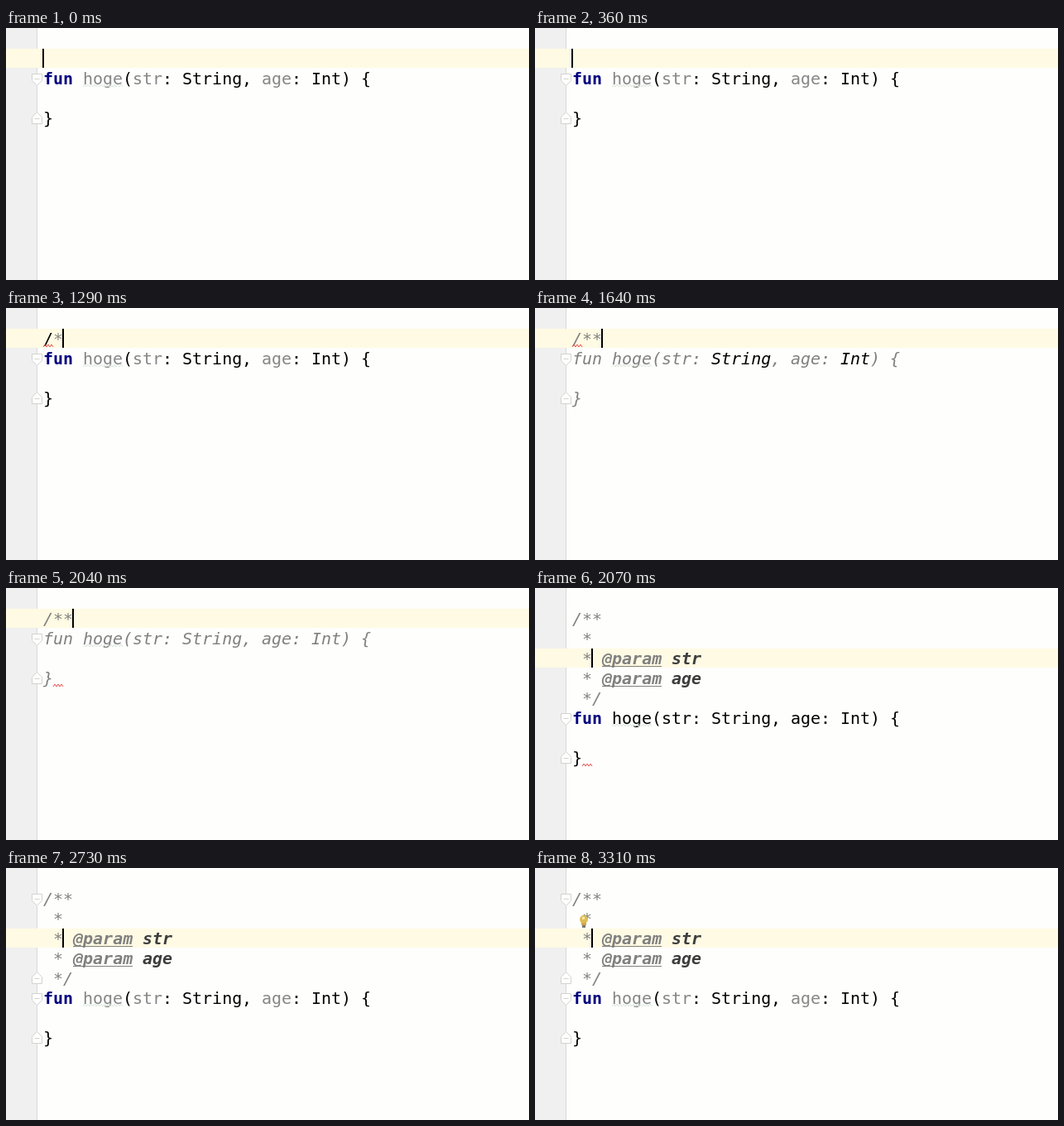
An HTML page with a canvas that plays this animation: 632x304 px, repeating every 3.46 s.

```html
<!DOCTYPE html>
<html lang="en">
<head>
<meta charset="utf-8">
<title>Doc comment completion</title>
<style>
  html, body { margin: 0; width: 100%; height: 100%; overflow: hidden; background: #fefefd; }
  canvas { display: block; }
</style>
</head>
<body>
<canvas id="editor" width="632" height="304"></canvas>
<script>
const ctx = document.getElementById('editor').getContext('2d');
const LOOP = 3460, LEFT = 45, CHAR = 12, LINE = 24;
const INK = '#000', KEYWORD = '#000080', UNUSED = '#868686', COMMENT = '#808080', RED = '#e8504c';

// Moments, in ms, at which the editor state changes
const AT = {
  slash: 730, error: 1030, star: 1290, comment: 1310, secondStar: 1640,
  types: 1760, enter: 2070, unused: 2480, folds: 2710, bulb: 3240
};

const colX = col => LEFT + col * CHAR;

function rect(x, y, w, h, color) {
  ctx.fillStyle = color;
  ctx.fillRect(x, y, w, h);
}

function text(row, col, str, color = INK, style = '') {
  ctx.font = `${style} 20px "DejaVu Sans Mono", monospace`;
  ctx.fillStyle = color;
  ctx.fillText(str, colX(col), row * LINE + 20);
}

function wave(row, col, length, color) {
  const y = row * LINE + 23, end = colX(col + length);
  ctx.beginPath();
  ctx.moveTo(colX(col), y);
  for (let x = colX(col) + 2, up = true; x <= end; x += 2, up = !up) ctx.lineTo(x, up ? y - 3 : y);
  ctx.strokeStyle = color;
  ctx.lineWidth = 1;
  ctx.stroke();
}

// Fold marker: pentagon pointing down (dir 1) or up (dir -1)
function fold(row, dir) {
  ctx.save();
  ctx.translate(37.5, row * LINE + 13.5);
  ctx.scale(1, dir);
  ctx.beginPath();
  ctx.moveTo(-6, -6);
  ctx.lineTo(6, -6);
  ctx.lineTo(6, 2);
  ctx.lineTo(0, 8);
  ctx.lineTo(-6, 2);
  ctx.closePath();
  ctx.fillStyle = '#fff';
  ctx.fill();
  ctx.strokeStyle = '#d2d2d0';
  ctx.lineWidth = 1;
  ctx.moveTo(-3, 0);
  ctx.lineTo(3, 0);
  ctx.stroke();
  ctx.restore();
}

function bulb(x, y) {
  ctx.beginPath();
  ctx.arc(x, y, 5, 0, 7);
  ctx.fillStyle = '#dfbd55';
  ctx.fill();
  rect(x - 2, y - 3, 3, 3, '#f8e6a4');
  rect(x - 3, y + 4, 6, 3, '#cfa94c');
  rect(x - 2, y + 7, 4, 3, '#77776c');
}

function background(row) {
  rect(0, 0, 632, 304, '#fefefd');
  rect(0, 0, 37, 304, '#f0f0f0');
  rect(37, 0, 1, 304, '#d8d8d6');
  rect(0, row * LINE + 1, 632, LINE - 1, '#fffae3');
}

function funCode(row, t) {
  const commented = t >= AT.comment && t < AT.enter;
  const style = commented ? 'italic' : '';
  const base = commented ? COMMENT : INK;
  const type = commented && t >= AT.types ? COMMENT : INK;
  const name = commented ? COMMENT : t >= AT.enter && t < AT.unused ? INK : UNUSED;
  text(row, 0, 'fun', commented ? COMMENT : KEYWORD, commented ? 'italic' : 'bold');
  [
    [4, 'hoge', name], [8, '(', base], [9, 'str', name], [12, ':', base],
    [14, 'String', type], [20, ',', base], [22, 'age', name], [25, ':', base],
    [27, 'Int', type], [30, ') {', base]
  ].forEach(([col, str, color]) => text(row, col, str, color, style));
  text(row + 2, 0, '}', base, style);
  wave(row, 4, 4, '#dbe8db');
  fold(row, 1);
  fold(row + 2, -1);
  if (t >= AT.types && t < AT.unused) wave(row + 2, 1, 1, RED);
}

function opening(t) {
  if (t >= AT.comment) text(1, 0, t < AT.secondStar ? '/*' : '/**', COMMENT, 'italic');
  else if (t >= AT.slash) {
    text(1, 0, '/');
    if (t >= AT.star) text(1, 1, '*', UNUSED);
  }
  if (t >= AT.error && t < AT.types) wave(1, 0, 1, RED);
}

function docBody(t) {
  [2, 3, 4].forEach(row => text(row, 1, '*', COMMENT, 'italic'));
  text(5, 1, '*/', COMMENT, 'italic');
  ['str', 'age'].forEach((param, i) => {
    text(3 + i, 3, '@param', COMMENT, 'italic bold');
    rect(colX(3), (3 + i) * LINE + 22, 6 * CHAR, 1, COMMENT);
    text(3 + i, 10, param, '#3d3d3d', 'italic bold');
  });
  if (t >= AT.folds) {
    fold(1, 1);
    fold(5, -1);
  }
  if (t >= AT.bulb) bulb(59, 62);
}

function draw(t) {
  const expanded = t >= AT.enter;
  const caretRow = expanded ? 3 : 1;
  const caretCol = expanded ? 2 : [AT.slash, AT.star, AT.secondStar].filter(at => t >= at).length;
  background(caretRow);
  opening(t);
  funCode(expanded ? 6 : 2, t);
  if (expanded) docBody(t);
  rect(colX(caretCol) - 1, caretRow * LINE + 1, 2, LINE - 1, INK);
}

const start = performance.now();
function tick() {
  draw((performance.now() - start) % LOOP);
  requestAnimationFrame(tick);
}
tick();
</script>
</body>
</html>
```
